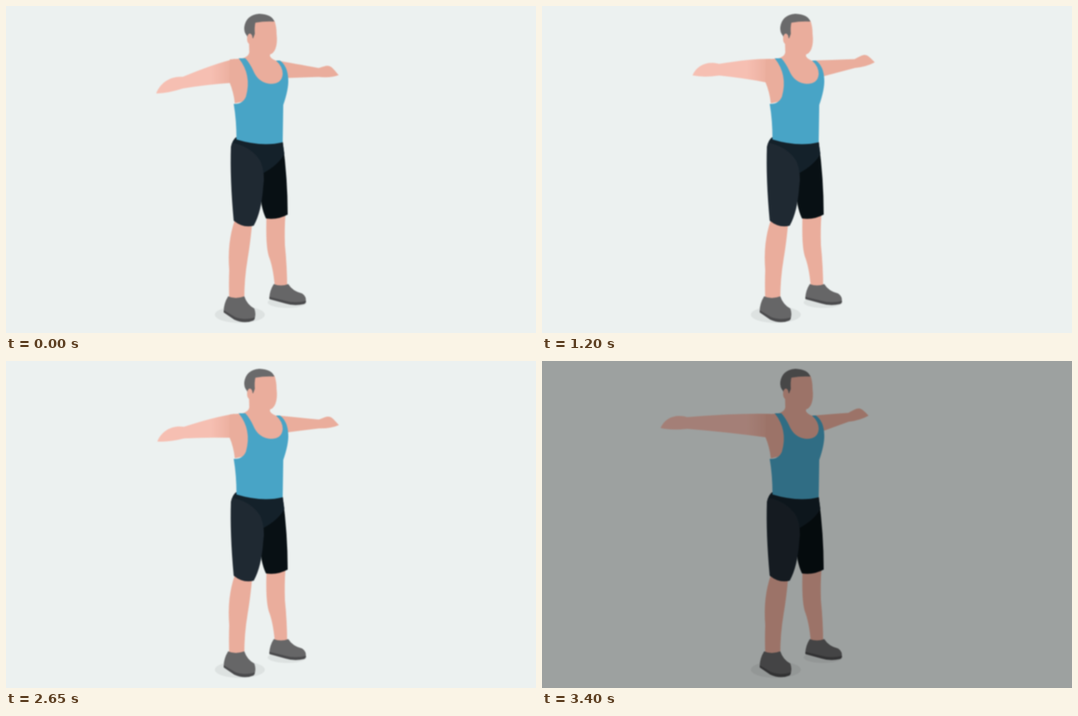
Recreate the animation shown at these times as an HTML page with a canvas. Size 952x588 px, loop 3450 ms.

```html
<!DOCTYPE html>
<html lang="en">
<head>
<meta charset="utf-8">
<title>Arm circles</title>
<style>
  html, body { margin: 0; width: 952px; height: 588px; overflow: hidden; }
  canvas { display: block; }
</style>
</head>
<body>
<canvas id="stage" width="952" height="588"></canvas>
<script>
const canvas = document.getElementById('stage');
const ctx = canvas.getContext('2d');

const LOOP = 3450, STEP = 50, DIM_FROM = 2800;
const START_ANGLE = 22, DEG_PER_MS = 0.2656;
const HAND_DROOP = 0.27;
const SKIN = '#eaad9c', SHADOW = '#dde2e1', SHOE = '#666667', SOLE = '#4b4b4d';

const armShade = ctx.createLinearGradient(368, 0, 410, 0);
armShade.addColorStop(0, '#f6bfb2');
armShade.addColorStop(1, SKIN);

// The wrist runs on an ellipse; hand points are offsets from the wrist.
const nearArm = {
  center: [289, 115], radius: [31, 33], wrist: 21, fill: armShade,
  shoulder: [411, 95], armpit: [404, 138], bulge: -4, armpitDrop: 1,
  hand: [[-20, -4], [-40, 5], [-48, 25]]
};
const farArm = {
  center: [556, 103], radius: [6, 23], wrist: 16, fill: SKIN,
  shoulder: [488, 98], armpit: [504, 128], bulge: 0, armpitDrop: 4,
  hand: [[20, -9], [20, -9], [36, 9]]
};

const mix = (p, q, k, dy) => [p[0] + (q[0] - p[0]) * k, p[1] + (q[1] - p[1]) * k + dy];

function drawArm(arm, angle) {
  const cos = Math.cos(angle), sin = Math.sin(angle);
  const x = arm.center[0] + arm.radius[0] * cos;
  const y = arm.center[1] + arm.radius[1] * sin;
  const top = [x, y], low = [x, y + arm.wrist];
  const armpit = [arm.armpit[0], arm.armpit[1] + arm.armpitDrop * sin];
  const [knuckle, finger, tip] = arm.hand.map(
    ([dx, dy]) => [x + dx, y + dy + Math.abs(dx) * HAND_DROOP * sin]);
  ctx.beginPath();
  ctx.moveTo(...arm.shoulder);
  ctx.quadraticCurveTo(...mix(arm.shoulder, top, 0.4, arm.bulge), ...top);
  ctx.bezierCurveTo(...knuckle, ...finger, ...tip);
  ctx.quadraticCurveTo(...mix(tip, low, 0.4, 4), ...low);
  ctx.quadraticCurveTo(...mix(low, armpit, 0.5, arm.bulge / 2), ...armpit);
  ctx.closePath();
  ctx.fillStyle = arm.fill;
  ctx.fill();
}

function shape(fill, d) {
  ctx.fillStyle = fill;
  ctx.fill(new Path2D(d));
}

function oval(fill, x, y, rx, ry) {
  ctx.fillStyle = fill;
  ctx.beginPath();
  ctx.ellipse(x, y, rx, ry, 0, 0, 7);
  ctx.fill();
}

function drawLegs() {
  oval(SHADOW, 420, 555, 45, 15);
  oval(SHADOW, 505, 533, 35, 10);
  shape(SKIN, 'M411 385L442 392Q439 425 434 455Q428 490 428 528L401 528Q400 500 401 475Q397 425 411 385Z');
  shape(SKIN, 'M468 376L502 374Q500 400 501 430Q505 470 505 506L483 506Q480 470 472 450Q466 430 468 376Z');
  shape(SHOE, 'M399 522Q412 528 428 522Q433 537 446 544Q450 555 446 563Q428 571 412 562L391 549Q391 535 399 522Z');
  shape(SHOE, 'M481 500Q494 505 507 500Q515 513 532 517Q541 523 538 533Q518 538 502 532L473 524Q474 511 481 500Z');
  shape(SOLE, 'M391 547L411 559Q428 566 447 560Q447 565 443 566Q428 572 410 564L391 551Z');
  shape(SOLE, 'M473 523L502 530Q520 535 539 530Q539 535 535 536Q518 540 502 535L473 527Z');
}

function drawShorts() {
  shape('#081014', 'M455 246L497 244Q506 310 506 375Q488 385 467 382Q462 372 459 357Z');
  shape('#14212a', 'M413 236Q455 250 497 244L500 266Q490 285 463 300L420 275L405 252Q406 242 413 236Z');
  shape('#1f2932', 'M406 246Q440 252 457 279Q466 300 462 325Q459 370 445 395Q426 400 409 386Q402 310 404 253Z');
}

function drawTorso() {
  shape(SKIN, 'M402 96L428 94Q448 130 434 170L411 175Q409 155 401 136Z');
  shape(SKIN, 'M436 50L482 40L474 90Q477 96 487 99L496 103L502 130L485 148L458 145L425 100L420 95Q436 92 437 83Z');
  shape('#48a4c6', 'M418 94L430 94Q438 103 444 116Q453 138 475 140Q496 140 497 122Q497 109 485 98L492 98'
    + 'Q506 108 507 132Q508 149 498 178L497 245Q460 254 414 240Q414 205 409 176Q425 177 431 163Q442 124 418 94Z');
}

function drawHead() {
  shape(SKIN, 'M444 26L482 26Q486 36 486 50Q488 66 484 77Q480 87 472 87Q455 86 437 73L437 50Z');
  shape('#6a6a6b', 'M433 54Q427 47 428 38Q431 16 455 14Q478 15 482 28Q465 27 448 30Q446 38 447 50L444 58L434 58Z');
  oval(SKIN, 438, 59, 5, 9.5);
}

function draw(time) {
  const t = Math.floor(time % LOOP / STEP) * STEP;
  const angle = (START_ANGLE + t * DEG_PER_MS) * Math.PI / 180;
  const dimmed = t >= DIM_FROM;
  document.body.style.background = dimmed ? '#9da1a0' : '#ecf1f0';
  canvas.style.filter = `blur(0.8px) brightness(${dimmed ? 0.667 : 1})`;
  ctx.clearRect(0, 0, 952, 588);
  drawLegs();
  drawShorts();
  drawArm(farArm, angle);
  drawArm(nearArm, angle);
  drawTorso();
  drawHead();
}

const start = performance.now();
function tick() {
  draw(performance.now() - start);
  requestAnimationFrame(tick);
}
tick();
</script>
</body>
</html>
```
